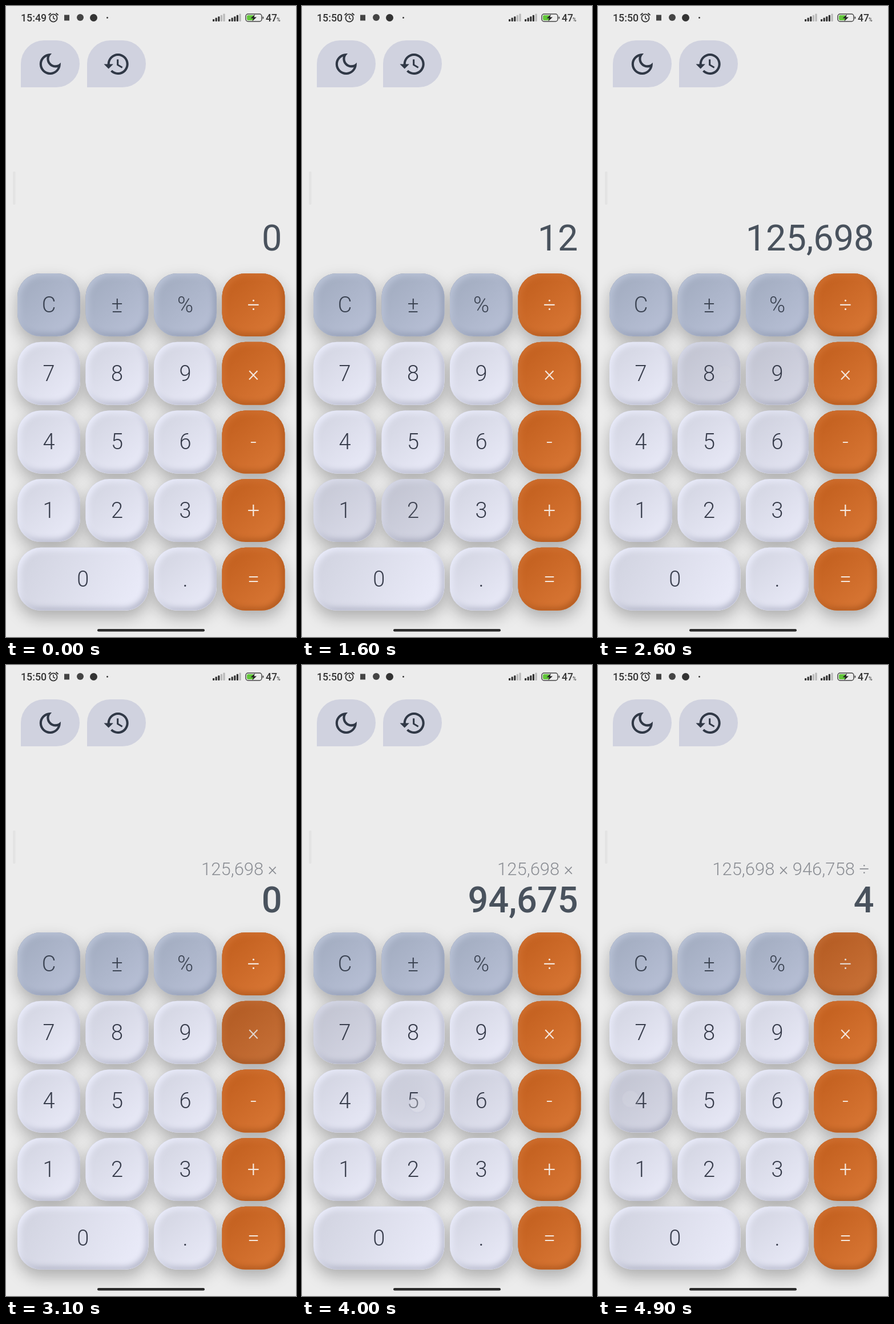
An HTML page with a canvas that plays this animation: 508 by 1102 pixels, repeating every 5 s.

```html
<!DOCTYPE html>
<html lang="en">
<head>
<meta charset="utf-8">
<title>Calculator</title>
<style>
  html, body { margin: 0; width: 100%; height: 100%; overflow: hidden; background: #ececec; }
  canvas { display: block; }
</style>
</head>
<body>
<canvas id="stage" width="508" height="1102"></canvas>
<script>
const W = 508, H = 1102, LOOP = 5000, STEP = 100;
const ctx = document.getElementById('stage').getContext('2d');
const base = document.createElement('canvas');
base.width = W;
base.height = H;

const THEMES = {
  digit: { from: '#d3d5e2', to: '#e9eaf8', ink: '#373c4b', light: 'rgba(238,240,255,.95)', dark: 'rgba(120,124,148,.5)' },
  tool: { from: '#a2acc0', to: '#b8c0d6', ink: '#3a4251', light: 'rgba(190,199,219,.9)', dark: 'rgba(110,122,148,.55)' },
  op: { from: '#c25f1e', to: '#d97735', ink: '#f5e8de', light: 'rgba(218,122,58,.6)', dark: 'rgba(140,62,10,.55)' }
};

const MOON = new Path2D('M9.37 5.51C9.19 6.15 9.1 6.82 9.1 7.5c0 4.08 3.32 7.4 7.4 7.4.68 0 1.35-.09 1.99-.27C17.45 17.19 14.93 19 12 19c-3.86 0-7-3.14-7-7 0-2.93 1.81-5.45 4.37-6.49zM12 3c-4.97 0-9 4.03-9 9s4.03 9 9 9 9-4.03 9-9c0-.46-.04-.92-.1-1.36-.98 1.37-2.58 2.26-4.4 2.26-2.98 0-5.4-2.42-5.4-5.4 0-1.81.89-3.42 2.26-4.4C12.92 3.04 12.46 3 12 3z');
const HISTORY = new Path2D('M13 3a9 9 0 0 0-9 9H1l3.89 3.89.07.14L9 12H6c0-3.87 3.13-7 7-7s7 3.13 7 7-3.13 7-7 7c-1.93 0-3.68-.79-4.94-2.06l-1.42 1.42A8.954 8.954 0 0 0 13 21a9 9 0 0 0 0-18zm-1 5v5l4.28 2.54.72-1.21-3.5-2.08V8H12z');

// Key grid; '0' spans two columns.
const keys = {};
['C±%÷', '789×', '456-', '123+', '0 .='].forEach((row, r) => {
  [...row].forEach((label, c) => {
    if (label === ' ') return;
    const x = 20 + c * 119.5, y = 467 + r * 119.7;
    const w = label === '0' ? 229.5 : 110;
    const path = new Path2D();
    path.roundRect(x, y, w, 110, 41);
    const theme = c === 3 ? THEMES.op : r === 0 ? THEMES.tool : THEMES.digit;
    keys[label] = { label, x, y, w, path, theme };
  });
});

// Taps: key, press time, finger position.
const taps = [
  ['1', 1080, 58, 876], ['2', 1400, 194, 880], ['5', 1650, 195, 762],
  ['6', 1930, 314, 762], ['9', 2200, 313, 642], ['8', 2400, 222, 642],
  ['×', 2750, 433, 645], ['9', 3130, 313, 642], ['4', 3260, 74, 762],
  ['6', 3380, 323, 769], ['7', 3640, 75, 642], ['5', 3860, 202, 767],
  ['8', 4130, 200, 645], ['÷', 4430, 433, 522], ['4', 4720, 57, 758]
].map(([label, at, x, y]) => ({ key: keys[label], at, x, y }));
const REACT = 70;

const clamp = v => Math.max(0, Math.min(1, v));

function text(g, str, x, y, size, weight, color, align = 'left') {
  g.font = `${weight} ${size}px Roboto, sans-serif`;
  g.fillStyle = color;
  g.textAlign = align;
  g.fillText(str, x, y);
}

function bar(g, x, y, w, h, r, color) {
  g.fillStyle = color;
  g.beginPath();
  g.roundRect(x, y, w, h, r);
  g.fill();
}

function disc(g, x, y, r, color) {
  g.fillStyle = color;
  g.beginPath();
  g.arc(x, y, r, 0, Math.PI * 2);
  g.fill();
}

function line(g, points, width, color) {
  g.strokeStyle = color;
  g.lineWidth = width;
  g.beginPath();
  points.forEach(([x, y], i) => i ? g.lineTo(x, y) : g.moveTo(x, y));
  g.stroke();
}

function insetShadow(g, key, offset, blur, color) {
  g.save();
  g.clip(key.path);
  g.shadowColor = color;
  g.shadowBlur = blur;
  g.shadowOffsetX = g.shadowOffsetY = offset;
  const frame = new Path2D();
  frame.rect(key.x - 60, key.y - 60, key.w + 120, 230);
  frame.addPath(key.path);
  g.fill(frame, 'evenodd');
  g.restore();
}

function drawKey(g, key) {
  const { x, y, w, theme } = key;
  const fill = g.createLinearGradient(x + w * .12, y + 8, x + w * .88, y + 102);
  fill.addColorStop(0, theme.from);
  fill.addColorStop(1, theme.to);
  g.fillStyle = fill;
  g.fill(key.path);
  insetShadow(g, key, -4, 11, theme.dark);
  insetShadow(g, key, 4, 11, theme.light);
  text(g, key.label, x + w / 2, y + 68, 38, 300, theme.ink, 'center');
}

function drawIcon(g, path, x, y) {
  g.save();
  g.translate(x, y);
  g.scale(2.06, 2.06);
  g.fillStyle = '#303846';
  g.fill(path, 'evenodd');
  g.restore();
}

function drawAlarm(g, x, y) {
  const ink = '#333';
  g.strokeStyle = ink;
  g.lineWidth = 1.8;
  g.beginPath();
  g.arc(x, y + 1, 6.6, 0, Math.PI * 2);
  g.stroke();
  line(g, [[x, y - 3], [x, y + 1.5], [x + 3, y + 3]], 1.6, ink);
  line(g, [[x - 8.5, y - 4], [x - 4.5, y - 7.5]], 2, ink);
  line(g, [[x + 8.5, y - 4], [x + 4.5, y - 7.5]], 2, ink);
}

function drawSignal(g, x, strong) {
  for (let i = 0; i < 5; i++) {
    const h = 4 + i * 2.4;
    bar(g, x + i * 4.6, 27 - h, 3.2, h, 1, i < strong ? '#333' : '#b9b9b9');
  }
}

function drawStatus(g) {
  drawAlarm(g, 83, 20);
  bar(g, 102, 15.5, 9, 10, 0, '#444');
  disc(g, 130, 20, 6, '#444');
  disc(g, 153.5, 20.5, 6.5, '#333');
  disc(g, 177.5, 20.5, 1.4, '#333');
  drawSignal(g, 362, 3);
  drawSignal(g, 390, 4);
  g.strokeStyle = '#444';
  g.lineWidth = 1.5;
  g.beginPath();
  g.roundRect(420, 14, 28, 13, 4);
  g.stroke();
  bar(g, 422, 16, 12, 9, 2, '#62c63a');
  bar(g, 449.5, 18.5, 1.8, 4, 1, '#444');
  g.fillStyle = '#222';
  g.fill(new Path2D('M436 14.5L428.5 21.5H433L431.5 26.5L439 19.5H434.5Z'));
  text(g, '47', 455, 27, 17.5, 500, '#333');
  text(g, '%', 474, 26.5, 9, 500, '#444');
}

function drawTab(g, x, icon, iconX) {
  bar(g, x, 60, 103, 82, [41, 41, 41, 0], '#d0d2df');
  drawIcon(g, icon, iconX, 76.8);
}

function drawBase(g) {
  g.fillStyle = '#ececec';
  g.fillRect(0, 0, W, H);
  drawStatus(g);
  drawTab(g, 26, MOON, 52.6);
  drawTab(g, 142, HISTORY, 169.4);
  bar(g, 12, 289, 4.5, 58, 2, '#e3e3e3');

  const all = Object.values(keys);
  g.save();
  g.shadowColor = 'rgba(0,0,0,.27)';
  g.shadowBlur = 28;
  g.shadowOffsetY = 12;
  g.fillStyle = '#bbb';
  all.forEach(key => g.fill(key.path));
  g.restore();
  all.forEach(key => drawKey(g, key));
  bar(g, 160, 1088, 188, 4.5, 2.2, '#2b2b2b');
}

const group = s => s.replace(/\B(?=(\d{3})+$)/g, ',');

function readout(t) {
  let value = '0', past = '';
  for (const { key, at } of taps) {
    if (t < at + REACT) break;
    if (key.theme === THEMES.op) {
      past += `${group(value)} ${key.label} `;
      value = '0';
    } else {
      value = value === '0' ? key.label : value + key.label;
    }
  }
  return { value: group(value), past };
}

function drawRipple(tap, age) {
  const grow = clamp((age - REACT) / 120);
  const alpha = .115 * clamp(grow * 1.6) * (1 - clamp((age - 420) / 340));
  if (alpha <= 0) return;
  const r = 15 + 150 * grow ** 1.5;
  const soft = ctx.createRadialGradient(tap.x, tap.y, 0, tap.x, tap.y, r);
  const ink = a => `rgba(55,60,75,${a})`;
  soft.addColorStop(0, ink(alpha));
  soft.addColorStop(.35 + .65 * grow, ink(alpha * grow));
  if (grow < 1) soft.addColorStop(1, ink(0));
  ctx.fillStyle = soft;
  ctx.fill(tap.key.path);
}

function drawFinger(tap, age) {
  const alpha = 1 - clamp((age - 20) / 190);
  if (age < 0 || alpha <= 0) return;
  ctx.save();
  ctx.globalAlpha = alpha;
  disc(ctx, tap.x, tap.y, 15, '#eaeaf2');
  ctx.strokeStyle = '#c3c7d8';
  ctx.lineWidth = 2;
  ctx.beginPath();
  ctx.arc(tap.x, tap.y, 14.5, 0, Math.PI * 2);
  ctx.stroke();
  ctx.restore();
}

function render(t) {
  ctx.drawImage(base, 0, 0);
  text(ctx, t < 100 ? '15:49' : '15:50', 26, 27, 17.8, 500, '#333');
  const { value, past } = readout(t);
  text(ctx, past.trim(), 475, 367, 31, 300, '#8b8e94', 'right');
  text(ctx, value, 483.5, past ? 432 : 427, 63, past ? 500 : 400, '#49525d', 'right');
  taps.forEach(tap => drawRipple(tap, t - tap.at));
  taps.forEach(tap => drawFinger(tap, t - tap.at));
}

function tick() {
  const t = performance.now() % LOOP;
  render(Math.floor(t / STEP) * STEP);
  requestAnimationFrame(tick);
}

drawBase(base.getContext('2d'));
tick();
</script>
</body>
</html>
```
